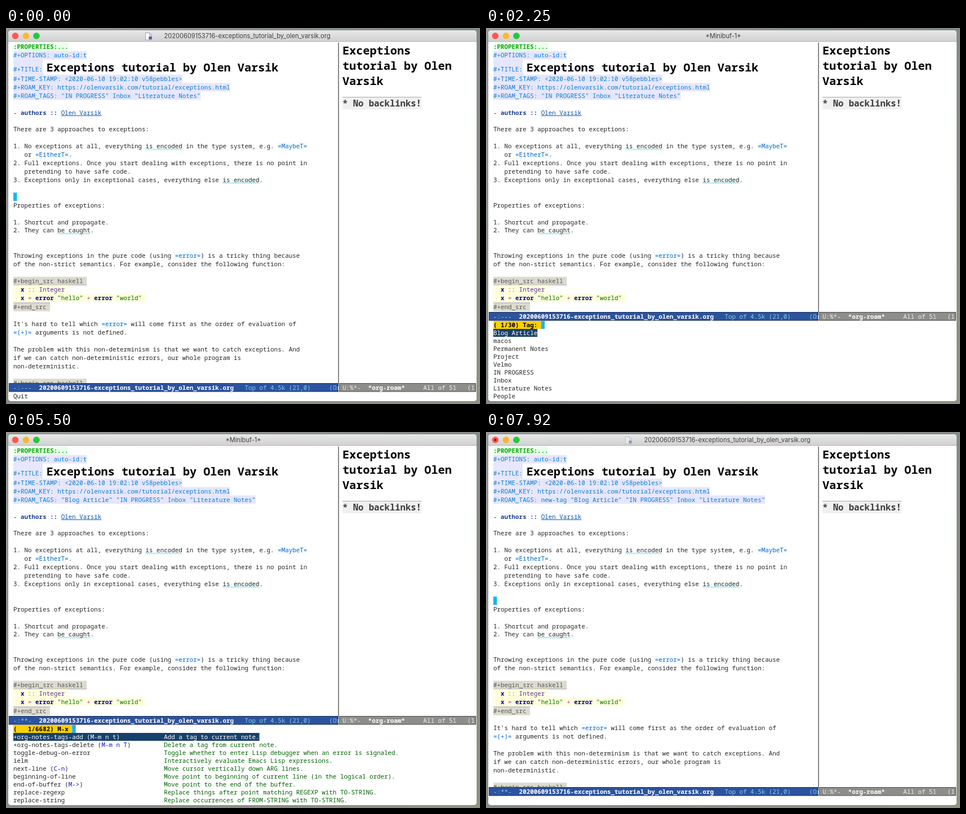
An HTML page that plays this animation: 841x666 px, repeating every 8000 ms.

```html
<!DOCTYPE html>
<html lang="en">
<head>
<meta charset="utf-8">
<title>Adding tags to a note</title>
<style>
  html, body { margin: 0; width: 100%; height: 100%; overflow: hidden; background: #8b918c; }
  svg { display: block; width: 841px; height: 666px; }
  text { font-family: "Noto Sans Mono", "DejaVu Sans Mono", monospace; white-space: pre; }
  .title { font: 11.1px Inter, "Open Sans", sans-serif; fill: #404040; text-anchor: middle; }
</style>
</head>
<body>
<svg id="stage" viewBox="0 0 841 666" xmlns="http://www.w3.org/2000/svg">
  <defs>
    <linearGradient id="desk" x2="1" y2="1">
      <stop stop-color="#969a98"/><stop offset=".5" stop-color="#858c87"/><stop offset="1" stop-color="#929284"/>
    </linearGradient>
    <linearGradient id="bar" x2="0" y2="1">
      <stop stop-color="#e8e8e8"/><stop offset="1" stop-color="#d0d0d0"/>
    </linearGradient>
    <clipPath id="frame"><rect x="4" y="4" width="831" height="657" rx="5"/></clipPath>
    <clipPath id="left"><rect x="4" y="25" width="586" height="640"/></clipPath>
    <clipPath id="right"><rect x="591" y="25" width="242.5" height="640"/></clipPath>
  </defs>
  <rect width="841" height="666" fill="url(#desk)"/>
  <rect x="3.5" y="3.5" width="832" height="658" rx="5.5" fill="#777b78"/>
  <g clip-path="url(#frame)">
    <rect x="4" y="4" width="831" height="657" fill="#fff"/>
    <rect x="4" y="4" width="831" height="20" fill="url(#bar)"/>
    <path d="M4 24H835" stroke="#b4b4b4"/>
    <g id="titlebar"></g>
    <g id="note" clip-path="url(#left)"></g>
    <g id="sidebar"></g>
    <g id="bottom"></g>
  </g>
</svg>
<script>
const LOOP = 8000, SIZE = 10.86, ADVANCE = 0.6, CHAR = SIZE * ADVANCE;
const LEFT = 13, SIDE = 597, PITCH = 14.92, ROW = 14;
const AUTHOR = 'Olen Varsik', FILE = '20200609153716-exceptions_tutorial_by_olen_varsik.org';

const STYLES = {
  d: { fill: '#00a800', bg: '#eaffea', bold: 1 },
  m: { fill: '#0a7fd0', bg: '#e6e6fc' },
  b: { fill: '#1c3f94', bold: 1 },
  l: { fill: '#0a55a8', line: 1 },
  v: { fill: '#0a66c8', bg: '#f7fdff' },
  w: { wave: 1 },
  f: { fill: '#555', bg: '#dcdbcf' },
  s: { bg: '#ffffdc' },
  x: { fill: '#00007f', bg: '#ffffdc', bold: 1 },
  e: { fill: '#00007f', bg: '#ffffdc', medium: 1 },
  o: { fill: '#c8389a', bg: '#ffffdc' },
  t: { fill: '#5a35a5', bg: '#ffffdc' },
  g: { fill: '#007000', bg: '#ffffdc' },
  p: { fill: '#000', bg: '#fbd000', bold: 1 },
  c: { fill: '#fff', bg: '#17416b' },
  k: { fill: '#1414d8' },
  h: { fill: '#006400' },
  i: { fill: '#85ceeb' },
  j: { fill: '#f0f0ef' },
  n: { fill: '#fff', bold: 1 },
  T: { fill: '#000', bold: 1 },
  H: { fill: '#3c3c3c', bg: '#f0f0f0', bold: 1 }
};

const $ = id => document.getElementById(id);
const escape = s => s.replace(/&/g, '&amp;').replace(/</g, '&lt;');
const rect = (x, y, w, h, fill) => `<rect x="${x}" y="${y}" width="${w}" height="${h}" fill="${fill}"/>`;
const stroke = (d, color, width = 1) => `<path d="${d}" fill="none" stroke="${color}" stroke-width="${width}"/>`;
const circle = (x, y, r, fill) => `<circle cx="${x}" cy="${y}" r="${r}" fill="${fill}"/>`;

function wave(x, y, width) {
  let d = `M${x} ${y}q1 -1.8 2 0`;
  for (let dx = 4; dx <= width; dx += 2) d += 't2 0';
  return stroke(d, '#30cfe0');
}

// Draws one row around its vertical middle; {k:text} gives text the style k.
function row(x, mid, markup, size = SIZE, height = PITCH) {
  const advance = size * ADVANCE, base = mid + size * 0.36;
  let boxes = '', texts = '', column = 0;
  for (const [all, key, inner] of markup.matchAll(/\{(\w):([^}]*)\}|[^{]+/g)) {
    const style = STYLES[key] || {}, content = inner ?? all;
    const left = x + column * advance, width = content.length * advance;
    const weight = style.bold ? 700 : style.medium ? 600 : 400;
    if (style.bg) boxes += rect(left, mid - height / 2, width, height, style.bg);
    if (style.line) boxes += stroke(`M${left} ${base + 1.7}h${width}`, style.fill);
    if (style.wave) boxes += wave(left, base + 1.8, width);
    texts += `<text x="${left}" y="${base}" font-size="${size}" font-weight="${weight}" fill="${style.fill || '#262626'}">${escape(content)}</text>`;
    column += content.length;
  }
  return boxes + texts;
}

function cursor(x, mid, height) {
  return rect(x, mid - height / 2, CHAR, height, '#21b5f5') +
    rect(x + 2.8, mid - 2.5, 1, 1.4, '#148cc8') + rect(x + 2.8, mid + 2, 1, 1.4, '#148cc8');
}

const BODY = `
- {b:authors ::} {l:${AUTHOR}}

There are 3 approaches to exceptions:

1. No exceptions at all, everything {w:is encoded} in the type system, e.g. {v:=MaybeT=}
   or {v:=EitherT=}.
2. Full exceptions. Once you start dealing with exceptions, there is no point in
   pretending to have safe code.
3. Exceptions only in exceptional cases, everything else {w:is encoded}.


Properties of exceptions:

1. Shortcut and propagate.
2. They can {w:be caught}.


Throwing exceptions in the pure code (using {v:=error=}) is a tricky thing because
of the non-strict semantics. For example, consider the following function:

{f:#+begin_src haskell }
{s:  }{x:x}{s: }{o:::}{s: }{t:Integer}{s: }
{s:  }{x:x}{s: }{o:=}{s: }{e:error}{s: }{g:"hello"}{s: }{o:+}{s: }{e:error}{s: }{g:"world"}{s: }
{f:#+end_src }

It's hard to tell which {v:=error=} will come first as the order of evaluation of
{v:=(+)=} arguments is not defined.

The problem with this non-determinism is that we want to catch exceptions. And
if we can catch non-deterministic errors, our whole program is
non-deterministic.

{f:#+begin_src haskell }`.split('\n');

function drawNote(tags, focused) {
  const head = 90, first = head + 3 * PITCH;
  let out = row(LEFT, 33.5, '{d::PROPERTIES:...}') + row(LEFT, 48.3, '{m:#+OPTIONS: auto-id:t}') +
    rect(LEFT, 55.6, 8 * CHAR, 27.2, STYLES.m.bg) + row(LEFT, 73, '{m:#+TITLE:}') +
    row(LEFT + 9 * CHAR, 69.8, `{T:Exceptions tutorial by ${AUTHOR}}`, 20.2) +
    row(LEFT, head, '{m:#+TIME-STAMP: <2020-06-10 19:02:10 v58pebbles>}') +
    row(LEFT, head + PITCH, '{m:#+ROAM_KEY: https://olenvarsik.com/tutorial/exceptions.html}') +
    row(LEFT, head + 2 * PITCH, `{m:#+ROAM_TAGS: ${tags}"IN PROGRESS" Inbox "Literature Notes"}`);
  let shift = 0;
  BODY.forEach((markup, i) => {
    const isEnd = markup.includes('end_src');
    if (isEnd) shift = 1.5;
    const mid = first + i * PITCH + shift;
    out += row(LEFT, mid, markup);
    if (isEnd) out += stroke(`M${LEFT} ${mid - 7.5}h${10 * CHAR}`, '#a7a6aa');
    if (markup.includes('begin_src')) out += stroke(`M${LEFT} ${mid + 7}h${20 * CHAR}`, '#a7a6aa');
  });
  return out + (focused ? cursor(LEFT, 299, PITCH) : '');
}

function drawSidebar(bottom) {
  const heading = ['Exceptions', `tutorial by ${AUTHOR.split(' ')[0]}`, AUTHOR.split(' ')[1]];
  return stroke(`M590 26V${bottom}`, '#555', 1.4) +
    heading.map((s, i) => row(SIDE, 40 + i * 27, `{T:${s}}`, 20.2)).join('') +
    row(SIDE, 133.5, '{H:* No backlinks!}', 15.55, 21) +
    stroke(`M${SIDE} 122.5h140`, '#a7a7a7');
}

function drawModeLines(top, modified) {
  const mid = top + 8;
  const box = (x, w, fill, edge) =>
    `<rect x="${x + .5}" y="${top + .5}" width="${w - 1}" height="14.5" fill="${fill}" stroke="${edge}"/>`;
  return rect(4, top, 831, 160, '#fff') +
    box(5, 585, '#2c539f', '#1a2f54') + box(591, 243, '#8d8e89', '#4e4e4d') +
    `<g clip-path="url(#left)">${row(LEFT, mid, `{i:-:${modified ? '**' : '--'}-  }{n:${FILE}}{i:   Top of 4.5k (21,0)     (Org}`)}</g>` +
    `<g clip-path="url(#right)">${row(SIDE, mid, '{j:U:%*-  }{n:*org-roam*}{j:     All of 51   (1,0)}')}</g>`;
}

function drawTitlebar(minibuffer, modified) {
  const lights = circle(16.5, 14, 5.8, '#fc5651') + circle(35.5, 14, 5.8, '#fdb62f') + circle(54, 14, 5.8, '#29c440');
  if (minibuffer) return lights + '<text class="title" x="421" y="18">*Minibuf-1*</text>';
  const icon = '<path d="M247.5 8.5h7l4 4v8.500h-11z" fill="#fafafa" stroke="#a0a0a8"/>' +
    stroke('M254.500 8.500v4h4', '#a0a0a8') + circle(256, 17.5, 3, '#5861a8');
  return lights + (modified ? circle(16.5, 14, 2, '#7c1613') : '') +
    `<g opacity="${modified ? .5 : 1}">${icon}</g><text class="title" x="428" y="18">${FILE}</text>`;
}

const DELETE = ['+org-notes-tags-delete (M-m n T)', 'Delete a tag from current note.'];
const ADD = ['+org-notes-tags-add (M-m n t)', 'Add a tag to current note.'];
const COMMANDS = [
  ['toggle-debug-on-error', 'Toggle whether to enter Lisp debugger when an error is signaled.'],
  ['ielm', 'Interactively evaluate Emacs Lisp expressions.'],
  ['next-line (C-n)', 'Move cursor vertically down ARG lines.'],
  ['beginning-of-line', 'Move point to beginning of current line (in the logical order).'],
  ['end-of-buffer (M->)', 'Move point to the end of the buffer.'],
  ['replace-regexp', 'Replace things after point matching REGEXP with TO-STRING.'],
  ['replace-string', 'Replace occurrences of FROM-STRING with TO-STRING.']
];
const TAGS = ['Blog Article', 'macos', 'Permanent Notes', 'Project', 'Velmo', 'IN PROGRESS', 'Inbox', 'Literature Notes', 'People'];

function drawMinibuffer({ prompt, items, selected = 0, typed = '' }) {
  const top = 526;
  let out = row(LEFT, top, `{p:${prompt}}${typed}`, SIZE, ROW) +
    cursor(LEFT + (prompt.length + typed.length) * CHAR, top, ROW);
  items.forEach((item, i) => {
    const [name, doc = ''] = [].concat(item);
    const label = doc ? name.padEnd(41) : name;
    const markup = i === selected ? `{c:${label}${doc}}`
      : label.replace(/\((.+?)\)/, '({k:$1})') + (doc && `{h:${doc}}`);
    out += row(LEFT, top + (i + 1) * ROW, markup, SIZE, ROW);
  });
  return out;
}

const BLOG = '"Blog Article" ';
const mx = (n, items) => ({ prompt: `(   ${n}/6682) M-x `, items: [...items, ...COMMANDS], selected: n - 1 });
const pickTag = { prompt: '( 1/30) Tag: ', items: TAGS };

function typeTag(typed) {
  const items = TAGS.filter(tag => tag.toLowerCase().includes(typed));
  return { prompt: items.length ? `( 1/${items.length}) Tag: ` : '( 0/0) Tag: ', items, typed };
}

const SCENES = [
  { at: 0, tags: '', echo: 'Quit' },
  { at: 580, tags: '', mini: mx(1, [DELETE, ADD]) },
  { at: 1000, tags: '', mini: mx(2, [DELETE, ADD]) },
  { at: 1750, tags: '', mini: pickTag },
  { at: 2920, tags: BLOG },
  { at: 5170, tags: BLOG, mini: mx(1, [ADD, DELETE]) },
  { at: 5830, tags: BLOG, mini: pickTag },
  ...[...'new-tag'].map((_, i, word) => ({ at: 6500 + i * 110, tags: BLOG, mini: typeTag(word.slice(0, i + 1).join('')) })),
  { at: 7500, tags: 'new-tag ' + BLOG }
];

function show({ tags, mini, echo }) {
  const modified = tags !== '', top = mini ? 503 : 629;
  $('titlebar').innerHTML = drawTitlebar(mini, modified);
  $('note').innerHTML = drawNote(tags, !mini);
  $('sidebar').innerHTML = drawSidebar(top);
  $('bottom').innerHTML = drawModeLines(top, modified) +
    (mini ? drawMinibuffer(mini) : echo ? row(LEFT, 652, echo) : '');
}

let current;
function tick(now) {
  const time = now % LOOP;
  const scene = SCENES.findLast(s => s.at <= time);
  if (scene !== current) show(current = scene);
  requestAnimationFrame(tick);
}
tick(performance.now());
</script>
</body>
</html>
```
